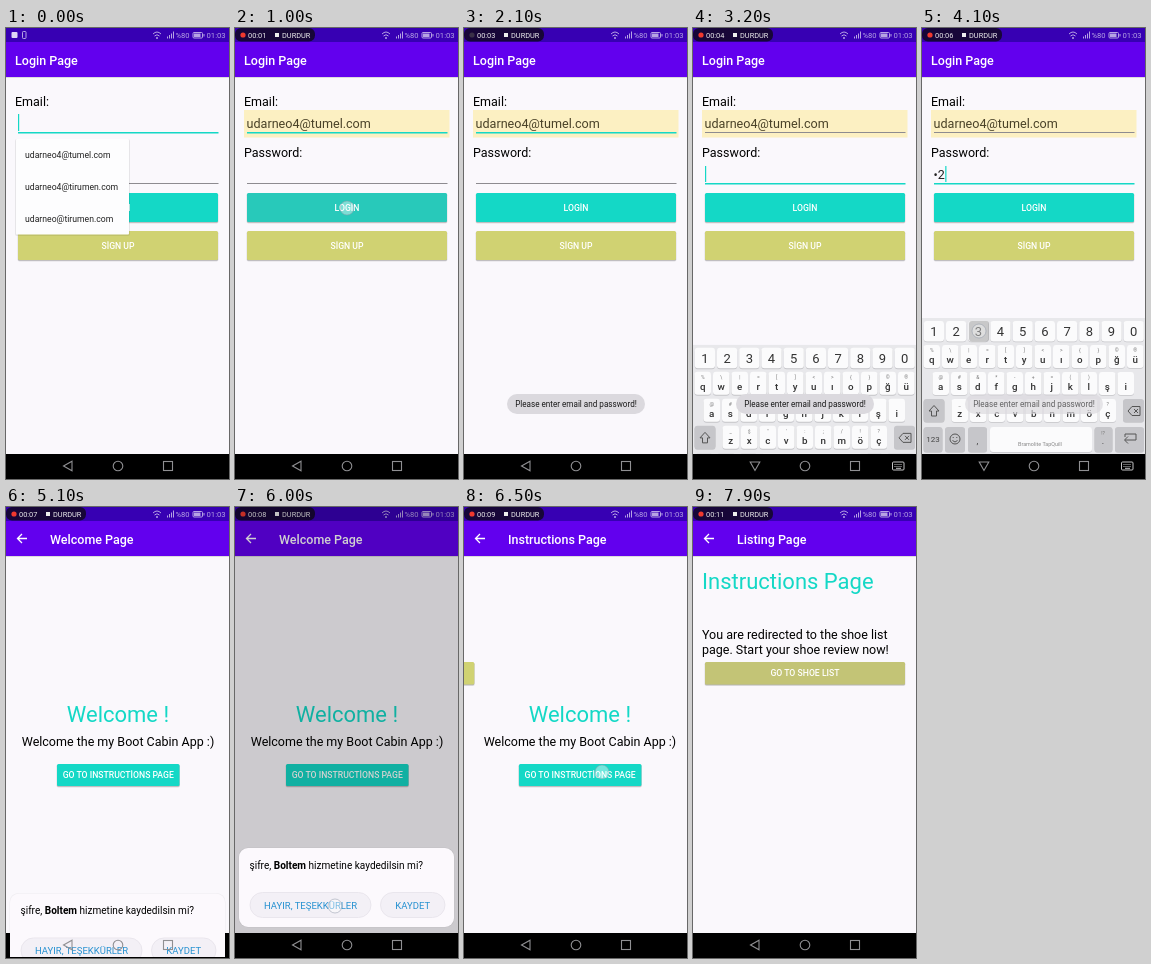
Animation of 223x451 px, one loop 8 s. Source, as an HTML page:

```html
<!DOCTYPE html>
<html lang="en">
<head>
<meta charset="utf-8">
<title>Login walkthrough</title>
<style>
  html, body { margin: 0; width: 100%; height: 100%; overflow: hidden; background: #000; }
  svg { display: block; width: 223px; height: 451px; }
  text { font-family: Roboto, "Noto Sans", sans-serif; white-space: pre; }
  .mid { text-anchor: middle; }
  .med { font-weight: 500; }
  .bold { font-weight: 700; }
</style>
</head>
<body>
<svg id="stage" viewBox="0 0 223 451"></svg>
<script>
const LOOP = 8000, STEP = 100;
const TEAL = '#14d8c6', OLIVE = '#d0d272', PAGE = '#faf8fc', GRAY = '#8d8b90';
const MAIL = 'udarneo4@tumel.com';
const MAILS = [MAIL, 'udarneo4@tirumen.com', 'udarneo@tirumen.com'];

// Markup helpers
const safe = s => s.replace('&', '&amp;').replace('<', '&lt;');
const text = (x, y, s, size, fill = '#000', cls = '', id = '') =>
  `<text id="${id}" class="${cls}" x="${x}" y="${y}" font-size="${size}" fill="${fill}">${s}</text>`;
const rect = (x, y, w, h, fill, r = 0, more = '') =>
  `<rect x="${x}" y="${y}" width="${w}" height="${h}" rx="${r}" fill="${fill}" ${more}/>`;
const group = (id, body) => `<g id="${id}">${body}</g>`;
const button = (id, x, y, w, h, fill, label, base) =>
  rect(x - .5, y + .5, w + 1, h + 1, '#000', 2, 'opacity=".1"') +
  rect(x, y + .7, w, h, '#000', 1.5, 'opacity=".2"') +
  rect(x, y, w, h, fill, 1.5) +
  rect(x, y, w, h, '#888', 1.5, `id="${id}" opacity="0"`) +
  text(x + w / 2, base, label, 8.67, '#fff', 'mid med');

function keyboard() {
  let out = rect(0, 290, 223, 136, '#e8e8eb');
  const dark = '#c6c6ca';
  const key = (x, y, w, h, fill = '#fbfbfc') =>
    rect(x, y + .8, w, h, '#c4c4c8', 3) + rect(x, y, w, h, fill, 3);
  const row = (chars, hints, x0, pitch, y, h, size, base, cls) => {
    [...chars].forEach((c, i) => {
      const mid = x0 + pitch * (i + .5);
      out += key(mid - pitch / 2 + 1, y, pitch - 2, h) + text(mid, base, c, size, '#333', cls);
      if (hints[i]) out += text(mid, y + 7, safe(hints[i]), 5, '#777', 'mid');
    });
  };
  row('1234567890', '', .8, 22.2, 293, 20.5, 13, 308, 'mid');
  row('qwertyuıopğü', '%\\|=[]<>{}©®', .5, 18.5, 317, 23, 9.8, 335, 'mid med');
  row('asdfghjklşi', '@#&*-+=()', 9.5, 18.5, 344, 23, 9.8, 362, 'mid med');
  row('zxcvbnmöç', '_$"\':;/!?', 28.5, 18.5, 371, 23, 9.8, 389, 'mid med');
  out += key(1.5, 371, 21, 23, dark) + key(201, 371, 21, 23, dark) +
    key(1.5, 399, 19, 25, dark) + key(23, 399, 20, 25, dark) + key(46, 399, 19, 25, dark) +
    key(68, 399, 102, 25) + key(172.5, 399, 18, 25, dark) + key(193, 399, 29, 25, dark);
  out += text(11, 414, '123', 8, '#444', 'mid') + text(55.5, 416, ',', 9, '#444', 'mid') +
    text(181, 416, '.', 9, '#444', 'mid') + text(181, 407, '!?', 5, '#777', 'mid') +
    text(118, 418, 'Bramolite TapQuill', 5.4, '#888', 'mid');
  out += `<g fill="none" stroke="#555" stroke-width="1">
    <path d="M12 377.5l-5 5.5h2.5v5h5v-5h2.5z"/>
    <path d="M206 383l4-4.5h8v9h-8zM212 381l4 4M216 381l-4 4"/>
    <circle cx="33" cy="411" r="5"/><path d="M30.5 412.5q2.5 3 5 0M31.2 409v1M34.8 409v1"/>
    <path d="M203 409v-3h11v6h-11M206 408.5l-3.5 3.5 3.5 3.5"/></g>`;
  return out + rect(-10, 293, 20, 20.5, '#000', 3, 'id="hitKey" fill-opacity=".2"');
}

const login =
  text(9, 78, 'Email:', 12.5) +
  rect(9, 82, 205.5, 27.5, '#fcf0c2', 0, 'id="fill"') +
  text(11.5, 100, MAIL, 12.6, '#4a4228', '', 'mail') +
  rect(12, 104, 200.5, 1, GRAY, 0, 'id="line1"') +
  rect(12, 86, 1.2, 17, TEAL, 0, 'id="caret1"') +
  text(9, 129, 'Password:', 12.5) +
  text(11.5, 150.5, '', 12.5, '#222', '', 'pass') +
  rect(12, 155, 200.5, 1, GRAY, 0, 'id="line2"') +
  rect(12, 138, 1.2, 16, TEAL, 0, 'id="caret2"') +
  button('hitLogin', 12, 165, 200, 29, TEAL, 'LOGİN', 183) +
  button('hitSign', 12, 203, 200, 29, OLIVE, 'SİGN UP', 220.5) +
  group('drop',
    rect(9, 111, 115, 97, '#000', 2, 'opacity=".08"') +
    rect(10, 111, 113, 95.5, '#fdfdfe', 1) +
    MAILS.map((m, i) => text(19, 130 + 32 * i, m, 8.67, '#222')).join(''));

const welcome =
  text(112, 214.8, 'Welcome !', 22, TEAL, 'mid') +
  text(112, 239, 'Welcome the my Boot Cabin App :)', 12.5, '#000', 'mid') +
  button('hitGo', 51, 257, 122.5, 22, TEAL, 'GO TO INSTRUCTİONS PAGE', 271);

const guide =
  text(9, 82, 'Instructions Page', 22, TEAL) +
  text(9, 132, 'You are redirected to the shoe list', 12.5) +
  text(9, 147, 'page. Start your shoe review now!', 12.5) +
  button('hitList', 12, 155, 200, 22.5, OLIVE, 'GO TO SHOE LIST', 169);

const LILAC = '#b6a3e4';
const header =
  rect(0, 49, 223, 1, '#000', 0, 'opacity=".12"') +
  rect(0, 0, 223, 14, '#3700b3') + rect(0, 14, 223, 35, '#6200ee') +
  text(9, 36.5, '', 12.5, '#fff', 'med', 'title') +
  '<path id="back" d="M21 31.5H12M16 27l-4.5 4.5L16 36" fill="none" stroke="#fff" stroke-width="1.3"/>' +
  group('icons', rect(5.5, 4, 6, 6, '#ded6f5', 1) +
    rect(16.5, 3.5, 3.5, 7, 'none', .8, `stroke="${LILAC}"`)) +
  group('pill', rect(0, 0, 80, 13.5, '#170638', 6) +
    '<circle id="dot" cx="8" cy="7" r="2.6"/>' +
    text(13, 10, '', 7.4, '#eee', '', 'clock') + rect(40, 5, 4, 4, '#eee') +
    text(47, 10, 'DURDUR', 7.4, '#eee')) +
  `<g fill="none" stroke="${LILAC}" stroke-width="1"><path d="M147 6q4-4 8 0M148.5 8q2.5-2.5 5 0"/>
   <path d="M161.5 10.5v-2M163.5 10.5v-3.5M165.5 10.5v-5M167.5 10.5v-7"/>
   <rect x="187" y="4.5" width="9.5" height="5.5" rx="1"/><path d="M198 6v2.5"/></g>` +
  `<circle cx="151" cy="10" r="1" fill="${LILAC}"/>` + rect(188, 5.5, 6.5, 3.5, LILAC) +
  text(169.5, 10.2, '%80', 7.6, LILAC) + text(200.5, 10.2, '01:03', 7.7, LILAC);

const pill = (x, w, label) =>
  rect(x, 385.5, w, 25, '#f3f0f6', 12.5, 'stroke="#e6e2ea" stroke-width=".8"') +
  text(x + w / 2, 401.5, label, 9.5, '#2490d0', 'mid');
const sheet =
  rect(3.5, 340.5, 216, 80, '#000', 9, 'opacity=".05"') +
  rect(4, 341, 215, 79, '#fcf9fd', 9) +
  text(14.5, 361.5, 'şifre, <tspan class="bold">Boltem</tspan> hizmetine kaydedilsin mi?', 10.05) +
  pill(15, 121, 'HAYIR, TEŞEKKÜRLER') + pill(145.5, 64.5, 'KAYDET');

const nav = `<g fill="none" stroke="#8f8f92" stroke-width="1.1">
  <path id="navBack" d="M57.5 438l8.5-4.8v9.6z"/><circle cx="112" cy="438" r="4.8"/>
  <rect x="157.5" y="433.5" width="9" height="9"/></g>
  <g id="navKeys" fill="none" stroke="#c4c4c6"><rect x="199.5" y="434" width="11.5" height="8" rx="1"/>
  <path d="M201.5 436.5h8M201.5 438.5h8" stroke-dasharray="1 1"/><path d="M203 440.3h5"/></g>`;

document.getElementById('stage').innerHTML =
  rect(0, 0, 223, 451, PAGE) + group('login', login) + group('welcome', welcome) +
  group('guide', guide) + header + group('keys', keyboard()) +
  group('toast', rect(43, 366, 138, 20, '#dbd9de', 10) +
    text(112, 379, 'Please enter email and password!', 8.15, '#1a1a1a', 'mid')) +
  rect(0, 0, 223, 451, '#000', 0, 'id="dim"') + rect(0, 426, 223, 25, '#000') +
  group('sheet', sheet) + rect(0, 450, 223, 1, '#000') + nav +
  '<circle id="touch" r="7" fill="#fff" fill-opacity=".4" stroke="#8e96a6" stroke-opacity=".55" stroke-width=".9"/>';

const ui = {};
document.querySelectorAll('[id]').forEach(e => { if (e.id) ui[e.id] = e; });

// Timing helpers
const part = (t, a, b) => Math.min(1, Math.max(0, (t - a) / (b - a)));
const smooth = p => .5 - .5 * Math.cos(Math.PI * p);
const slow = p => 1 - (1 - p) * (1 - p);
const within = (t, a, b) => t >= a && t < b;
const latest = (steps, t) => steps.reduce((v, [at, next]) => t >= at ? next : v, steps[0][1]);
const show = (e, o) => {
  e.setAttribute('opacity', +o);
  e.style.display = +o ? '' : 'none';
};
const move = (e, x, y = 0) => e.setAttribute('transform', `translate(${x} ${y})`);
const underline = (e, focused) => {
  e.setAttribute('fill', focused ? TEAL : GRAY);
  e.setAttribute('height', focused ? 1.5 : 1);
};

const TITLES = [[0, 'Login Page'], [4700, 'Welcome Page'], [6400, 'Instructions Page'], [7900, 'Listing Page']];
const TYPED = [[0, ''], [3700, '1'], [3900, '•2'], [4200, '••3'], [4400, '•••4'], [4500, '••••']];
const TOUCHES = [ // from, to, x, y
  [100, 300, 62, 127], [900, 1200, 112, 180], [2700, 2900, 95, 160],
  [3700, 3800, 12, 303], [3900, 4000, 34, 303], [4100, 4200, 57, 303], [4300, 4400, 79, 303],
  [4500, 4700, 112, 180], [6000, 6100, 100, 399], [6300, 6600, 138, 265]
];
const BLINKS = [[1300, 1400], [2100, 2200], [2700, 2800], [7400, 7500]];

function draw(t) {
  // Header
  const home = t < 4700;
  ui.title.textContent = latest(TITLES, t);
  ui.title.setAttribute('x', home ? 9 : 44);
  show(ui.back, !home);
  show(ui.icons, t < 200);
  show(ui.pill, t >= 200);
  const secs = Math.floor(t * .00135 + .5);
  ui.clock.textContent = '00:' + String(secs).padStart(2, '0');
  ui.dot.setAttribute('fill', BLINKS.some(([a, b]) => within(t, a, b)) ? '#3a3048' : '#f0392f');

  // Login form
  const filled = t >= 300, second = t >= 3000;
  show(ui.drop, 1 - part(t, 200, 500));
  show(ui.fill, filled);
  show(ui.mail, filled);
  show(ui.caret1, !filled);
  underline(ui.line1, !second);
  underline(ui.line2, second);
  const typed = latest(TYPED, t);
  ui.pass.textContent = typed;
  show(ui.caret2, second);
  ui.caret2.setAttribute('x', 12 + (typed ? ui.pass.getComputedTextLength() : 0));

  // Page slides
  const out1 = smooth(part(t, 4700, 5080)), out2 = smooth(part(t, 6463, 6900));
  move(ui.login, 223 * out1);
  show(ui.login, out1 < 1);
  move(ui.welcome, 223 * (out1 - 1 + out2));
  show(ui.welcome, t >= 4700 && out2 < 1);
  move(ui.guide, -223 * (1 - smooth(part(t, 6380, 6980))));
  show(ui.guide, t >= 6400);

  // Overlays
  const up = slow(part(t, 2950, 3400)) - smooth(part(t, 4680, 4900));
  move(ui.keys, 0, 136 * (1 - up));
  show(ui.keys, up > 0);
  ui.navBack.setAttribute('transform', up > .5 ? 'rotate(-90 62 438)' : '');
  show(ui.navKeys, up > .5);
  show(ui.toast, part(t, 1250, 1500) * (1 - part(t, 4000, 4300)));
  const gone = part(t, 6030, 6250);
  const rise = slow(part(t, 5000, 5280)) - smooth(gone);
  move(ui.sheet, 0, 110 * (1 - rise));
  show(ui.sheet, rise > 0);
  show(ui.dim, .185 * (part(t, 5100, 5500) - gone));

  // Touches and pressed buttons
  const hit = TOUCHES.find(([a, b]) => within(t, a, b));
  const typing = !!hit && within(t, 3700, 4500);
  show(ui.touch, !!hit);
  show(ui.hitKey, typing);
  if (hit) move(ui.touch, hit[2], hit[3]);
  if (typing) move(ui.hitKey, hit[2]);
  const press = (e, ...spans) => show(e, spans.some(([a, b]) => within(t, a, b)) ? .18 : 0);
  press(ui.hitLogin, [1000, 1200], [4500, 4800]);
  press(ui.hitSign);
  press(ui.hitGo, [6300, 6500]);
  press(ui.hitList, [7800, 8000]);
}

const begin = performance.now();
function tick() {
  const t = (performance.now() - begin) % LOOP;
  draw(Math.floor(t / STEP) * STEP);
  requestAnimationFrame(tick);
}
tick();
</script>
</body>
</html>
```
